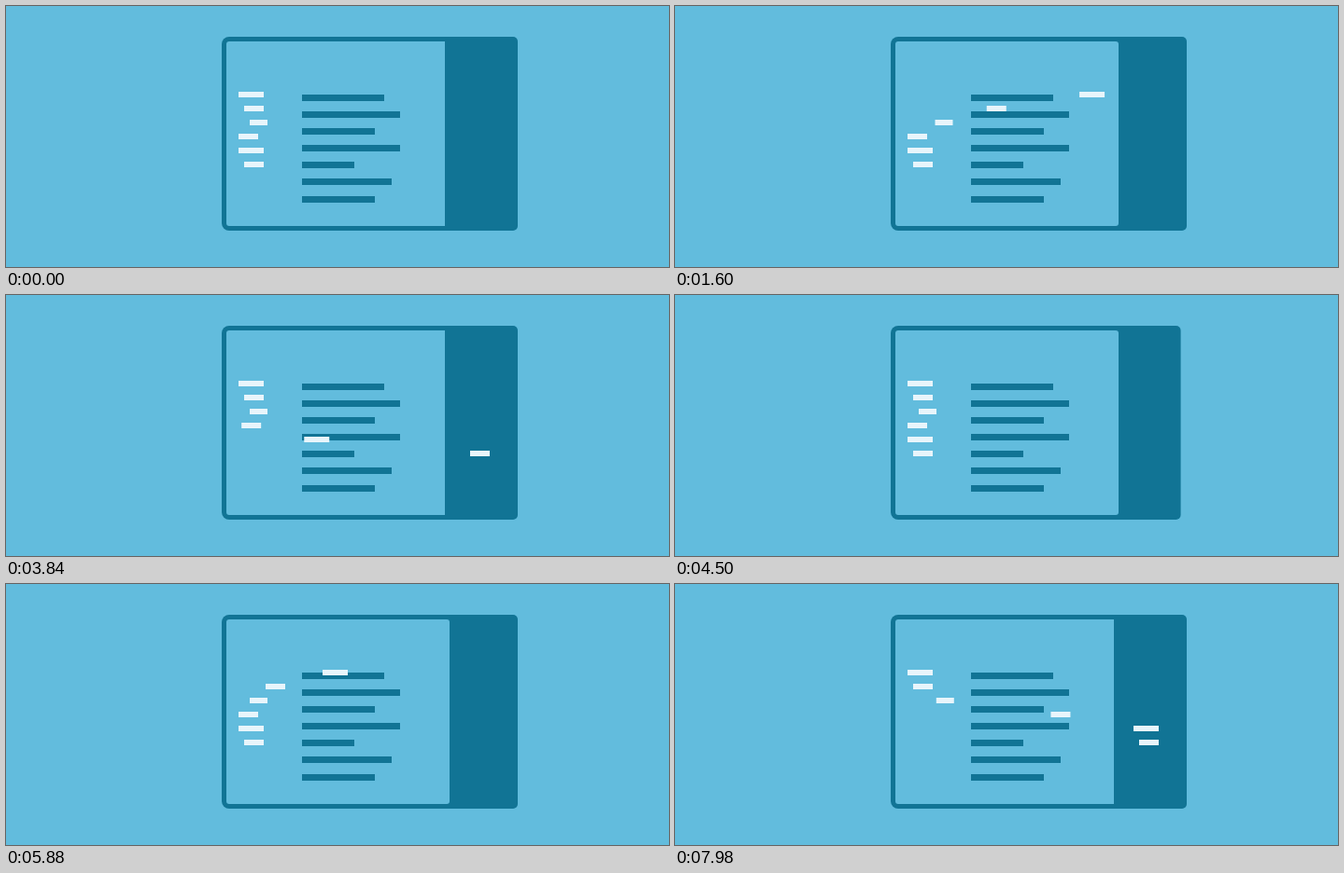
An HTML page with a canvas that plays this animation: 710x280 px, repeating every 8000 ms.

```html
<!DOCTYPE html>
<html lang="en">
<head>
<meta charset="utf-8">
<title>Side panel</title>
<style>
  html, body { margin: 0; width: 100%; height: 100%; overflow: hidden; background: #62bcdd; }
  canvas { display: block; width: 710px; height: 280px; }
</style>
</head>
<body>
<canvas id="stage" width="710" height="280"></canvas>
<script>
const ctx = document.getElementById('stage').getContext('2d');
const LIGHT = '#62bcdd', DARK = '#117495', WHITE = '#e8f5fb';
const LOOP = 8000, CYCLE = 4360;
const TRAVEL = 242;

const lineWidths = [88, 105, 78, 105, 56, 96, 78];
const itemWidths = [27, 21, 19, 21, 27, 21];
const indent = i => 6 * (i % 4 % 3 - (i === 4 ? 0 : 0));

function bezier(x1, y1, x2, y2) {
  const at = (a, b, s) => 3 * a * s * (1 - s) ** 2 + 3 * b * s * s * (1 - s) + s ** 3;
  return x => {
    let lo = 0, hi = 1;
    for (let i = 0; i < 24; i++) {
      const mid = (lo + hi) / 2;
      if (at(x1, x2, mid) < x) lo = mid; else hi = mid;
    }
    return at(y1, y2, lo);
  };
}
const ease = bezier(.25, .1, .25, 1);
const easeInOut = bezier(.42, 0, .58, 1);
const easeIn = x => x * x;

function tween(t, start, length, curve) {
  const x = (t - start) / length;
  return x <= 0 ? 0 : x >= 1 ? 1 : curve(x);
}

function box(color, x, y, w, h, radii = 0) {
  ctx.fillStyle = color;
  ctx.beginPath();
  ctx.roundRect(x, y, w, h, radii);
  ctx.fill();
}

function draw(t) {
  const open = 1 - tween(t, 68, 340, easeInOut) + tween(t, 890, 400, easeInOut);
  const panelInFront = t < 80 || t >= 3080;

  box(LIGHT, 0, 0, 710, 280);
  box(DARK, 402 + 68 * open, 33, 78, 208, [0, 5, 5, 0]);
  box(DARK, 231, 33, 249, 208, [8, 0, 0, 8]);
  box(LIGHT, 236, 38, 239, 198, 3);
  if (panelInFront) box(DARK, 470, 38, 5, 198);

  lineWidths.forEach((w, i) => box(DARK, 317, Math.round(95 + 18.09 * i), w, 7));

  // Items leave one after another and come back in the same order
  itemWidths.forEach((w, i) => {
    const shift = tween(t, 1335 + 92 * i, 305, easeIn) - tween(t, 3080 + 153 * i, 355, ease);
    box(WHITE, 249 + indent(i) + TRAVEL * shift, 92 + 15 * i, w, 6);
  });
}

const begin = performance.now();
function frame() {
  draw((performance.now() - begin) % LOOP % CYCLE);
  requestAnimationFrame(frame);
}
frame();
</script>
</body>
</html>
```
